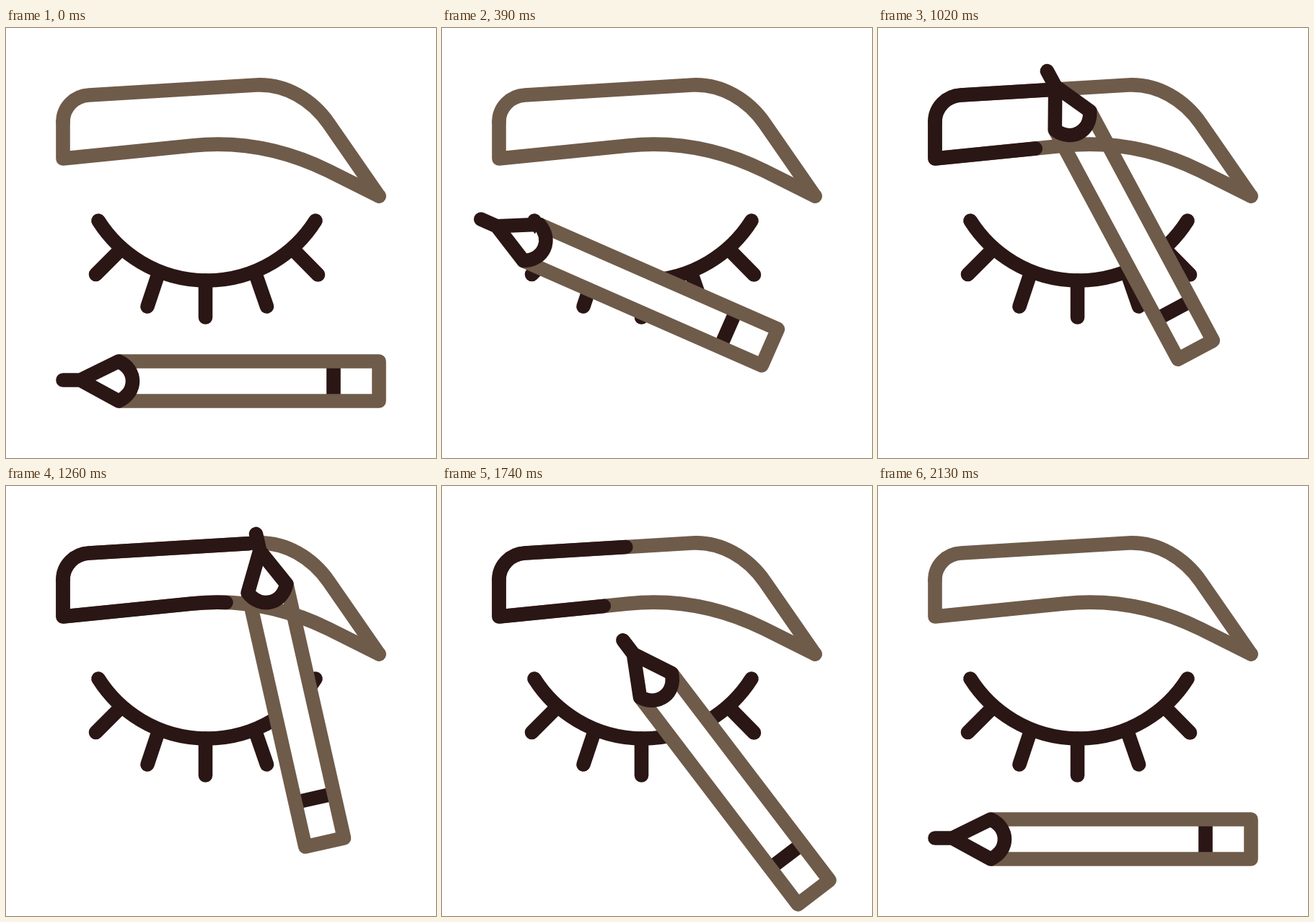
An HTML page with a canvas for the animation above (3600 ms loop, 596 by 596 pixels).

```html
<!DOCTYPE html>
<html lang="en">
<head>
<meta charset="utf-8">
<title>Eyebrow pencil</title>
<style>
html, body { margin: 0; width: 100%; height: 100%; overflow: hidden; background: #fff; }
canvas { display: block; width: 596px; height: 596px; }
</style>
</head>
<body>
<canvas id="stage" width="596" height="596"></canvas>
<script>
const ctx = document.getElementById('stage').getContext('2d');
const LOOP = 3600, STEP = 30, TURN = 1500, END = 2130;
const BROWN = '#6f5b4a', DARK = '#2a1614';
const REST = { x: 298, y: 489 };

// Both halves of the brow run from its inner end to its outer tip.
const brow = [
  new Path2D('M79 130V181L258 163C325 156 390 170 447 198L517 233'),
  new Path2D('M79 130C79 110 95 94 115 93L347 79C387 77 424 99 447 132L517 233')
];
const lid = new Path2D('M128 267A178 178 0 0 0 429 267');
const lashes = new Path2D(
  'M157 309L124.5 341.5M209 347L196 386M276.5 350V401M348 347L361.5 386M400 309L432.5 342');
const barrel = new Path2D('M156 462H517V517H156');
const band = new Path2D('M454 466V512');
const nib = new Path2D('M79 488H103L156 462C182 474 182 505 156 517L103 488');

// Keys are [time, value, ...]
const angleKeys = [[0, 0], [390, 23.7], [1020, 61.8], [TURN, 92.7],
  [1620, 73], [1740, 52.7], [END, 0]];
const inkKeys = [[575, 0], [630, 22], [1020, 191], [1260, 278], [1430, 330],
  [TURN, 333], [1740, 197], [END, 0]];
const pathKeys = [[0, 298, 489], [390, 254, 354], [540, 244, 300], [630, 245, 269],
  [760, 268, 246], [890, 302, 243], [1020, 337, 253], [1080, 352, 257.5],
  [1290, 400, 285], [TURN, 435, 327]];
const backKeys = [[TURN, 435, 327], [END, REST.x, REST.y]];

function segment(keys, t) {
  let i = 0;
  while (i < keys.length - 2 && t > keys[i + 1][0]) i++;
  const u = (t - keys[i][0]) / (keys[i + 1][0] - keys[i][0]);
  return [i, Math.min(1, Math.max(0, u))];
}

function linear(keys, t, k = 1) {
  const [i, u] = segment(keys, t);
  return keys[i][k] + (keys[i + 1][k] - keys[i][k]) * u;
}

function slope(keys, i, k) {
  const a = keys[Math.max(0, i - 1)], b = keys[Math.min(keys.length - 1, i + 1)];
  return (b[k] - a[k]) / (b[0] - a[0]);
}

function smooth(keys, t, k) {
  const [i, u] = segment(keys, t);
  const a = keys[i], b = keys[i + 1], d = b[0] - a[0];
  const v = 1 - u;
  return a[k] * (1 + 2 * u) * v * v + b[k] * u * u * (3 - 2 * u)
    + d * u * v * (slope(keys, i, k) * v - slope(keys, i + 1, k) * u);
}

function stroke(path, color, cap = 'round') {
  ctx.strokeStyle = color;
  ctx.lineCap = cap;
  ctx.stroke(path);
}

function withPencil(t, draw) {
  const [move, keys] = t < TURN ? [smooth, pathKeys] : [linear, backKeys];
  ctx.save();
  ctx.translate(move(keys, t, 1), move(keys, t, 2));
  ctx.rotate(linear(angleKeys, t) * Math.PI / 180);
  ctx.translate(-REST.x, -REST.y);
  draw();
  ctx.restore();
}

function drawBarrel() {
  ctx.fillStyle = '#fff';
  ctx.fill(barrel);
  stroke(band, DARK, 'butt');
  stroke(barrel, BROWN, 'butt');
}

function drawBrow(t) {
  brow.forEach(half => stroke(half, BROWN));
  const ink = linear(inkKeys, t);
  if (ink <= 0) return;
  ctx.setLineDash([ink, 2000]);
  brow.forEach(half => stroke(half, DARK));
  ctx.setLineDash([]);
}

function render(t) {
  ctx.fillStyle = '#fff';
  ctx.fillRect(0, 0, 596, 596);
  ctx.lineWidth = 19.6;
  ctx.lineJoin = 'round';
  stroke(lid, DARK);
  stroke(lashes, DARK);
  withPencil(t, drawBarrel);
  drawBrow(t);
  withPencil(t, () => stroke(nib, DARK));
}

const start = performance.now();
function tick() {
  const t = (performance.now() - start) % LOOP;
  render(Math.min(END, Math.floor(t / STEP) * STEP));
  requestAnimationFrame(tick);
}
tick();
</script>
</body>
</html>
```
